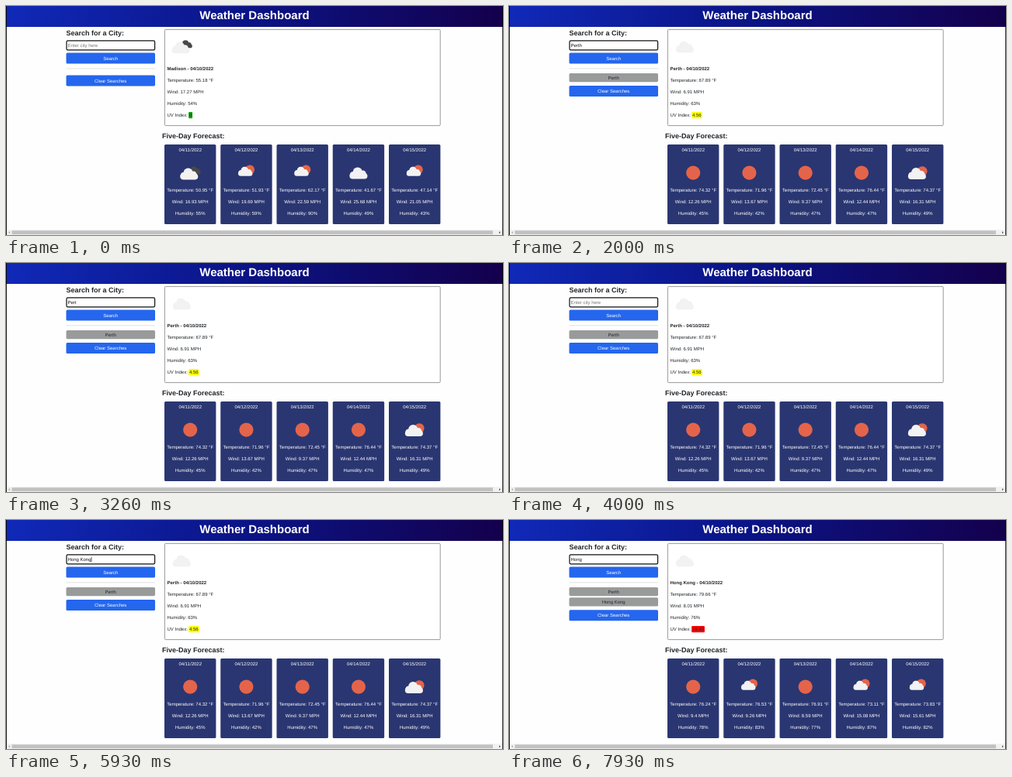
Recreate the animation shown at these times as an HTML page. Size 640 px wide and 296 px high, loop 8000 ms.

```html
<!DOCTYPE html>
<html lang="en">
<head>
<meta charset="utf-8">
<title>Weather Dashboard</title>
<style>
  html, body { margin: 0; width: 100%; height: 100%; overflow: hidden; background: #fefefe; }
  svg { display: block; width: 100vw; height: 100vh; }
  text { font: 6px "Liberation Sans", Arial, sans-serif; fill: #212529; white-space: pre; text-rendering: geometricPrecision; }
  .mid { text-anchor: middle; }
  .white { fill: #fff; }
  .bold { font-weight: bold; }
  .head { font-size: 9px; font-weight: bold; }
  .title { font-size: 15px; font-weight: bold; }
</style>
</head>
<body>
<svg id="stage" viewBox="0 0 640 296">
  <defs>
    <linearGradient id="bar" x1="0" y1="0" x2="640" y2="27" gradientUnits="userSpaceOnUse">
      <stop offset="0" stop-color="#1029b8"/>
      <stop offset=".5" stop-color="#0b1384"/>
      <stop offset="1" stop-color="#14004c"/>
    </linearGradient>
    <g id="cloud">
      <rect x="-11.5" y="0" width="23" height="7.6" rx="3.8"/>
      <circle cx="-6.8" cy="2.4" r="4.4"/>
      <circle cx="-1.2" cy="-1.3" r="6"/>
      <circle cx="5.4" cy="1" r="4.4"/>
    </g>
  </defs>
  <rect width="640" height="296" fill="#fefefe"/>
  <rect width="640" height="27" fill="url(#bar)"/>
  <text class="title white mid" x="320" y="17.4">Weather Dashboard</text>

  <text class="head" x="77.5" y="38">Search for a City:</text>
  <rect x="78" y="44.9" width="113.6" height="12" rx="1.6" fill="#fff" stroke="#101010" stroke-width="1.2"/>
  <text id="field" x="79.5" y="53"></text>
  <rect id="caret" y="47.6" width=".6" height="6.8" fill="#000"/>
  <rect x="77.5" y="60.5" width="114.5" height="14" rx="1.6" fill="#2466ee"/>
  <text class="white mid" x="134.7" y="69.6">Search</text>
  <rect x="77.5" y="80.6" width="114.5" height=".6" fill="#cfcfcf"/>
  <g id="past"></g>
  <g id="clear">
    <rect x="77.5" y="89.4" width="114.5" height="14" rx="1.6" fill="#2466ee"/>
    <text class="white mid" x="134.7" y="98.5">Clear Searches</text>
  </g>

  <rect x="204.4" y="30.4" width="354.8" height="124.2" rx="1.2" fill="#fff" stroke="#808080" stroke-width=".8"/>
  <text class="head" x="201" y="170.5">Five-Day Forecast:</text>
  <g id="report"></g>

  <rect y="289.3" width="640" height="6.7" fill="#f1f1f1"/>
  <rect x="7.5" y="290.3" width="619.5" height="4.8" fill="#c1c1c1"/>
  <path d="M5 291.2v3l-1.8-1.5z" fill="#a3a3a3"/>
  <path d="M635 291.2v3l1.8-1.5z" fill="#505050"/>
  <rect width=".9" height="296" fill="#000"/>
  <rect x="639.2" width=".8" height="296" fill="#000"/>
</svg>
<script>
const LOOP = 8000;
const $ = id => document.getElementById(id);

// each forecast day: icon, temperature, wind, humidity
const cities = [
  { at: 0, name: "Madison", icon: "dark", now: ["55.18", "17.27", 54], uv: ["0", "#0ca50c"], past: [],
    days: [["dark", "50.95", "16.93", 55], ["rain", "51.93", "19.69", 59], ["rain", "62.17", "22.59", 90],
           ["cloud", "41.67", "25.68", 49], ["rain", "47.14", "21.05", 43]] },
  { at: 2000, name: "Perth", icon: "cloud", now: ["67.89", "6.91", 63], uv: ["4.56", "#ffff00"], past: ["Perth"],
    days: [["sun", "74.32", "12.26", 45], ["sun", "71.96", "13.67", 42], ["sun", "72.45", "9.37", 47],
           ["sun", "76.44", "12.44", 47], ["few", "74.37", "16.31", 49]] },
  { at: 6260, name: "Hong Kong", icon: "cloud", now: ["79.66", "8.01", 76], uv: ["10.42", "#ff0000"], past: ["Perth", "Hong Kong"],
    days: [["sun", "76.24", "9.4", 78], ["rain", "76.53", "9.26", 83], ["sun", "76.91", "8.59", 77],
           ["rain", "73.11", "15.08", 87], ["rain", "73.83", "15.61", 82]] }
];

// keystrokes: word, then the time of each change in length
const typing = [
  { word: "Perth", step: 1, times: [660, 800, 930, 1060, 1200] },
  { word: "Perth", step: -1, times: [3260, 3400, 3730, 3800, 3930] },
  { word: "Hong Kong", step: 1, times: [4530, 4730, 4800, 4860, 5000, 5400, 5600, 5730, 5860] },
  { word: "Hong Kong", step: -1, times: [7330, 7460, 7860, 7895, 7930] }
];
const caretSpans = [[660, 1860], [4400, 6260]];

const text = (x, y, str, cls = "") => `<text x="${x}" y="${y}" class="${cls}">${str}</text>`;
const cloud = (x, y, s, fill) => `<use href="#cloud" transform="translate(${x} ${y}) scale(${s})" fill="${fill}"/>`;
const sun = (x, y, r) => `<circle cx="${x}" cy="${y}" r="${r}" fill="#e4644b"/>`;

const icons = {
  sun: () => sun(0, 0, 9.1),
  cloud: () => cloud(0, 0.3, 1, "#f2f2f2"),
  few: () => sun(6, -2, 6.4) + cloud(-0.8, 0.8, 1, "#f2f2f2"),
  rain: () => sun(4.6, -4, 6) + cloud(-1.2, -2, 0.8, "#f2f2f2"),
  dark: () => cloud(5.6, -3.2, 0.68, "#484848") + cloud(-1.4, 1.2, 1, "#f2f2f2")
};
const icon = (kind, x, y) => `<g transform="translate(${x} ${y})">${icons[kind]()}</g>`;
const lines = (temp, wind, hum) => [`Temperature: ${temp} °F`, `Wind: ${wind} MPH`, `Humidity: ${hum}%`];

function report(c) {
  const [uv, color] = c.uv;
  const width = uv.length > 1 ? (uv.length - 1) * 3.336 + 3.5 : 5;
  let out = icon(c.icon, 226.4, 52.4) + text(207.5, 83.2, `${c.name} - 04/10/2022`, "bold");
  lines(...c.now).forEach((s, i) => out += text(207.5, 98.2 + i * 15, s));
  out += text(207.5, 143.2, "UV Index:") +
    `<rect x="235.1" y="137" width="${width}" height="8.2" rx="1" fill="${color}"/>` + text(236, 143.2, uv);
  c.days.forEach(([kind, ...data], i) => {
    const x = 204 + i * 72.25, mid = x + 33.2;
    out += `<rect x="${x}" y="179" width="66.4" height="103" rx="1.6" fill="#2a3671"/>` +
      text(mid, 188.2, `04/${11 + i}/2022`, "mid white") + icon(kind, mid, 215.6);
    lines(...data).forEach((s, k) => out += text(mid, 240.4 + k * 15, s, "mid white"));
  });
  return out;
}

const pastButton = (name, i) =>
  `<rect x="77.5" y="${87 + i * 13.3}" width="114.5" height="11.2" rx="1.6" fill="#999b9b"/>` +
  text(134.7, 94.7 + i * 13.3, name, "mid");

function typed(t) {
  let value = "";
  for (const { word, step, times } of typing) {
    const n = times.filter(k => k <= t).length;
    if (n) value = word.slice(0, step > 0 ? n : word.length - n);
  }
  return value;
}

let shown = null;
function draw(t) {
  const city = cities.filter(c => c.at <= t).pop();
  if (city !== shown) {
    shown = city;
    const n = city.past.length;
    $("report").innerHTML = report(city);
    $("past").innerHTML = city.past.map(pastButton).join("");
    $("clear").setAttribute("transform", `translate(0 ${n ? 13.6 + (n - 1) * 13.3 : 0})`);
  }
  const value = typed(t), field = $("field");
  field.textContent = value || "Enter city here";
  field.style.fill = value ? "#111" : "#757575";
  const on = caretSpans.some(([a, b]) => t >= a && t < b);
  $("caret").setAttribute("x", 79.7 + (value ? field.getComputedTextLength() : 0));
  $("caret").setAttribute("opacity", on ? 1 : 0);
}

const start = performance.now();
function tick() {
  draw((performance.now() - start) % LOOP);
  requestAnimationFrame(tick);
}
tick();
</script>
</body>
</html>
```
